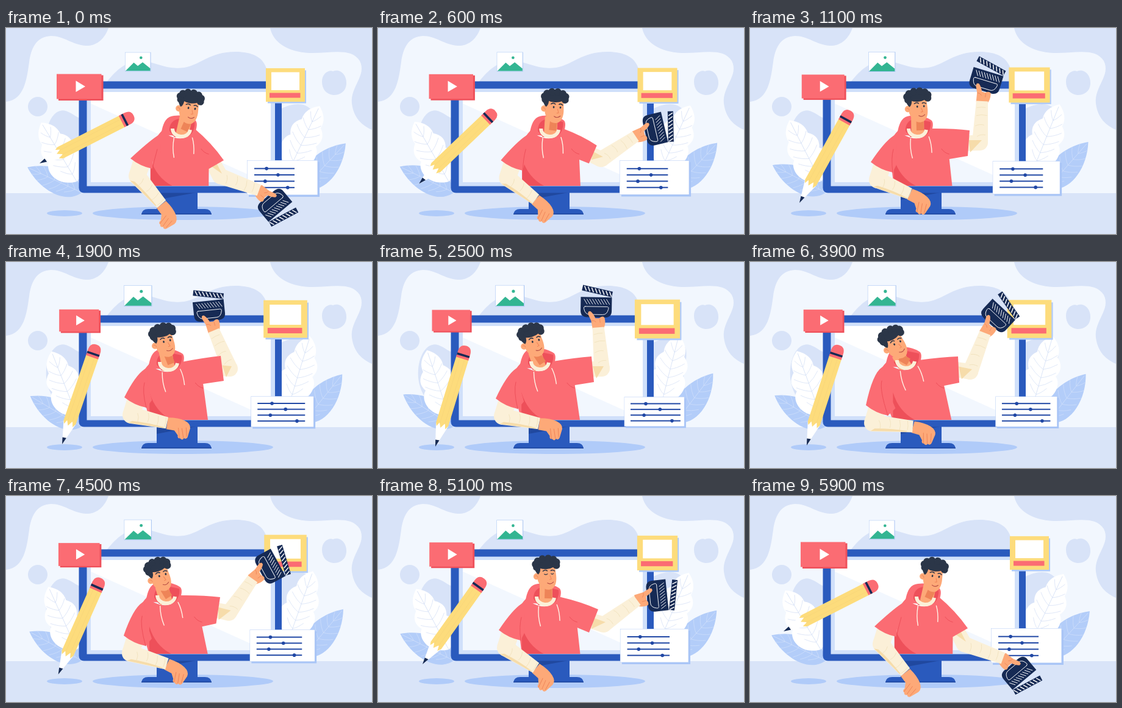
Write an HTML page with a canvas that moves like this. It is 600 by 338 pixels and loops after 6 s.

```html
<!DOCTYPE html>
<html lang="en">
<head>
<meta charset="utf-8">
<title>Video editing</title>
<style>
  html, body { margin: 0; width: 100%; height: 100%; overflow: hidden; background: #f2f7fe; }
  canvas { display: block; width: 100vw; height: 100vh; }
</style>
</head>
<body>
<canvas id="stage"></canvas>
<script>
const LOOP = 6000, RAD = Math.PI / 180;
const canvas = document.getElementById('stage');
const c = canvas.getContext('2d');

const C = {
  sky: '#f2f7fe', blob: '#d8e3f8', pool: '#b0cbf9', frame: '#2a5abd', deep: '#20489f',
  trim: '#d0e0fa', red: '#fb6c73', dark: '#ee505a', yellow: '#fddc7c', navy: '#162a54',
  skin: '#fda978', blush: '#ee8458', hair: '#2b3648', cream: '#fbf0d8', crease: '#efdfb8',
  tan: '#f6dcaa', leaf: '#b3cdf9', vein: '#cfdcf5', green: '#33b592', white: '#fff'
};

// Pose values at these times; the first value returns at 5900.
const TIMES = [0, 1100, 1900, 2500, 3900, 5100, 5900];
const POSE = {
  neck:   [[288, 275, 267, 266, 256, 275], [171, 171, 170, 169, 167, 171]],
  head:   [[298, 274, 259, 254, 238, 275], [135, 133, 135, 135, 139, 132], [8, -4, -14, -17, -27, -4]],
  cuffL:  [[204, 198, 194, 193, 190, 198], [214, 220, 222, 224, 235, 220]],
  wristL: [[255, 262, 264, 264, 267, 259], [289, 272, 264, 265, 270, 282], [80, 54, 36, 36, 43, 68]],
  cuffR:  [[357, 360, 352, 350, 341, 361], [217, 168, 154, 155, 155, 186]],
  under:  [[331, 357, 357, 354, 343, 346], [232, 210, 195, 197, 198, 224]],
  elbowR: [[351, 377, 367, 367, 361, 370], [243, 188, 175, 175, 180, 211], [20, -87, -113, -95, -69, -36]],
  clap:   [[140, 17, -6, 1, 43, 84]]
};
const PENCIL = [[55, 81, 92, 94, 93, 73], [222, 287, 299, 303, 301, 276], [27, 61, 71, 73, 72, 54.5]];

// Periodic cubic through the pose values, without overshoot.
function value(row, t) {
  const n = TIMES.length;
  const time = i => TIMES[(i + n) % n] + Math.floor(i / n) * LOOP;
  const val = i => row[(i + n) % n % 6];
  const slope = i => (val(i + 1) - val(i)) / (time(i + 1) - time(i));
  const tangent = i => {
    const a = slope(i - 1), b = slope(i);
    return a * b <= 0 ? 0 : 2 * a * b / (a + b);
  };
  let i = n - 1;
  while (t < TIMES[i]) i--;
  const h = time(i + 1) - time(i), u = (t - time(i)) / h, v = 1 - u;
  return v * v * (1 + 2 * u) * val(i) + u * u * (3 - 2 * u) * val(i + 1)
    + h * u * v * (v * tangent(i) - u * tangent(i + 1));
}
const sample = (rows, t) => rows.map(row => value(row, t));

function at(x, y, angle, scale, draw) {
  c.save();
  c.translate(x, y);
  c.rotate(angle * RAD);
  c.scale(scale, scale);
  draw();
  c.restore();
}
function fill(d, color) { c.fillStyle = color; c.fill(new Path2D(d)); }
function line(d, color, width = 1) {
  c.strokeStyle = color;
  c.lineWidth = width;
  c.stroke(new Path2D(d));
}
function rect(x, y, w, h, color) { c.fillStyle = color; c.fillRect(x, y, w, h); }
function oval(x, y, rx, ry, color) {
  c.fillStyle = color;
  c.beginPath();
  c.ellipse(x, y, rx, ry, 0, 0, 7);
  c.fill();
}
const dot = (x, y, r, color) => oval(x, y, r, r, color);

function backdrop() {
  rect(0, 0, 600, 338, C.sky);
  fill('M0 0H168C160 22 145 30 130 29C108 27 94 13 74 13C49 14 41 34 38 56C34 84 30 118 0 121Z', C.blob);
  fill('M433 0C438 24 462 39 497 41C530 42 566 31 580 54C592 78 564 96 567 124C570 148 584 160 600 167V0Z', C.blob);
  fill(`M98 271C102 240 62 225 66 176C69 146 84 132 98 136C110 140 116 148 124 148L164 90
    C178 72 196 53 222 54C248 56 262 69 292 65C318 61 334 39 376 39C404 39 420 48 426 64
    L452 132C468 124 490 120 502 136C514 158 490 190 508 220C518 240 506 260 500 271Z`, C.blob);
  dot(52, 129, 16, C.blob);
  fill('M518 88C518 74 530 68 536 71C548 66 559 77 558 92C557 104 548 110 537 110C525 109 518 100 518 88Z', C.blob);
  rect(0, 271, 600, 67, '#d9e4f8');
  oval(96, 304, 29, 5, C.pool);
  oval(290, 304, 148, 11, C.pool);
}

function leaf(x, y, angle, len, w, wavy) {
  const side = s => wavy
    ? `C${len * .08} ${s * w * .9} ${len * .36} ${s * w} ${len * .45} ${s * w * .64}
       Q${len * .6} ${s * w * .92} ${len * .72} ${s * w * .48}Q${len * .88} ${s * w * .55} ${len} 0`
    : `C${len * .15} ${s * w} ${len * .65} ${s * w * .9} ${len} 0`;
  const vein = wavy ? C.vein : '#d3e1fb';
  at(x, y, angle, 1, () => {
    fill(`M0 0${side(-1)}L0 0${side(1)}Z`, wavy ? C.white : C.leaf);
    line(`M0 0H${len * .96}`, vein, .7);
    for (let k = 1; k < 7; k++) {
      const s = len * k * .125, r = w * .6 * Math.sin(k * .4 + .3);
      line(`M${s + 14} ${-r}Q${s + 4} ${-r * .5} ${s} 0Q${s + 4} ${r * .5} ${s + 14} ${r}`, vein, .6);
    }
  });
}

function leaves(p) {
  leaf(124, 270, 205 + 8 * p, 98, 29);
  leaf(116, 252, 239 + 13.5 * p, 113, 36, true);
  leaf(488, 263, -47 - 6 * p, 101, 32);
  leaf(465, 231, -64.5 - 12 * p, 114, 36, true);
}

function monitor() {
  fill('M247 270H314V299H247Z', C.frame);
  fill('M247 270H312L247 282Z', C.deep);
  fill('M222 306Q223 297 233 297H326Q336 297 337 306Z', C.frame);
  rect(222, 304.5, 115, 1.5, C.deep);
  c.fillStyle = C.frame;
  c.beginPath();
  c.roundRect(119.5, 87.5, 332.5, 183, 8);
  c.fill();
  rect(132.5, 99.5, 308.5, 160, C.trim);
  rect(139, 105, 295, 148, C.white);
  fill('M139 124L425 253H139Z', C.sky);
}

function cards(p) {
  at(120, 96, 0, 1 - .16 * p, () => {
    rect(-34, -18.5, 73.5, 41.5, C.dark);
    rect(-37, -20.5, 73.5, 41, C.red);
    fill('M-5.5 -9.5V9L10 0Z', C.white);
  });
  at(216, 55.3, 0, 1 + .13 * p, () => {
    rect(-21, -15.5, 42.5, 31.5, '#a9c5f3');
    rect(-20.5, -15, 41, 30, C.white);
    fill('M-20 15L-6.5 1.5L0 7L8 1L20.5 11V15Z', C.green);
    dot(5.3, -6.5, 2.3, C.green);
  });
  at(458, 93.5, 0, 1 + .17 * p, () => {
    rect(-29, -24, 63, 54, C.pool);
    rect(-32, -27.5, 64, 55, C.yellow);
    rect(-23, -21, 46, 29.5, C.white);
    rect(-26, 13, 50.5, 8, C.red);
  });
  at(453, 245.5, 0, 1 - .16 * p, () => {
    rect(-55, -25.5, 116, 57, '#a9c5f6');
    rect(-58, -28.5, 116, 57, '#b4cbf5');
    rect(-57.5, -28, 115, 56, C.white);
  });
  const left = 407 + 7.5 * p, width = 66 + 17 * p;
  [.305, .59, .27, .83].forEach((f, i) => {
    const y = 230.6 + 2 * p + i * (10.4 - 1.1 * p);
    rect(left, y - 1, width, 2, '#2148a5');
    dot(left + width * f, y, 2.8, '#2148a5');
  });
}

function pencil(t) {
  const [x, y, angle] = sample(PENCIL, t);
  at(x, y, -angle, 1, () => {
    fill('M0 0L38 -10.5L46 0L38 10.5Z', C.white);
    fill('M0 0L11 -3.2L12 3.2Z', C.navy);
    fill('M38 -10.5H153V10.5H38L32 7L41 4L32 -1L40 -5L33 -8Z', C.yellow);
    line('M40 -4H153M40 4H153', '#f6d47a', .6);
    fill('M151 -10.5H162Q173 -10 173 0Q173 10 162 10.5H151Z', C.red);
    rect(155, -10.5, 3.6, 21, C.navy);
  });
}

// The board and the hand that grips it, placed from the wrist.
function clapper(angle, x, y) {
  at(x, y, angle, 1, () => {
    c.translate(-4, -33);
    fill('M-25.5 -16.5H25.5V6Q25.5 16.5 14 16.5H-14Q-25.5 16.5 -25.5 6Z', C.navy);
    for (let k = 0; k < 9; k++) line(`M${k * 4.6 - 20} -13l5 8`, C.white, .9);
    line('M-18 -1H18Q21 -1 20 3Q18 12 11 12H-11Q-18 12 -20 3Q-21 -1 -18 -1Z', C.white, .9);
    at(25, -17, 12, 1, () => {
      rect(-50, -9, 50, 9, C.navy);
      for (let k = 0; k < 8; k++) line(`M${k * 6 - 47} -7.5l4 6`, C.white, 1.5);
    });
    fill('M-5 37L-8 22L-13 12Q-14 6 -9 7Q-4 11 -1 18L5 18Q11 13 14 17Q17 27 12 37Z', C.skin);
    line('M-7 22Q-3 21 0 24M6 19L7 25', C.blush, .8);
  });
}

function limb(a, b, d, wa, wb, wd) {
  c.fillStyle = C.cream;
  [[a, b, wa, wb], [b, d, wb, wd]].forEach(([p, q, w, v]) => {
    const n = Math.atan2(q[1] - p[1], q[0] - p[0]) + Math.PI / 2;
    const s = Math.sin(n) / 2, k = Math.cos(n) / 2;
    c.beginPath();
    c.moveTo(p[0] + k * w, p[1] + s * w);
    c.lineTo(q[0] + k * v, q[1] + s * v);
    c.lineTo(q[0] - k * v, q[1] - s * v);
    c.lineTo(p[0] - k * w, p[1] - s * w);
    c.fill();
  });
  dot(b[0], b[1], wb / 2, C.cream);
  const turn = Math.atan2(d[1] - b[1], d[0] - b[0]) / RAD;
  at(b[0], b[1], turn, 1, () => {
    line('M10 -5Q14 0 13 8M27 -9Q31 -2 29 5M44 -8Q47 0 45 9M57 -8Q59 0 58 6', C.crease, .7);
  });
}

function rightArm(pose) {
  const [ex, ey, fore] = pose.elbowR, [tx, ty] = pose.cuffR, [ux, uy] = pose.under;
  const wx = ex + 68 * Math.cos(fore * RAD), wy = ey + 68 * Math.sin(fore * RAD);
  clapper(pose.clap[0], wx, wy);
  limb([(tx + ux) / 2 - 3, (ty + uy) / 2], [ex, ey], [wx, wy], 25, 26, 19);
  fill(`M${(tx + ux) / 2} ${(ty + uy) / 2 - 5}L${ex + 3} ${ey - 4}L${ux + 4} ${uy - 6}Z`, C.tan);
}

function torso(pose) {
  const [nx, ny] = pose.neck, [tx, ty] = pose.cuffR, [ux, uy] = pose.under;
  const [hx, hy, tilt] = pose.head;
  const bl = 216 + nx * .072, br = 317 + nx * .053, ax = nx * .45 + 203;
  at(nx, ny, 0, 1, () => {
    fill('M-34 4C-32 -6 -30 -20 -20 -25C-6 -30 12 -27 23 -19C27 -14 24 -3 19 8Z', C.red);
    fill('M-20 -2C-21 -13 -14 -21 -4 -22L21 -17C23 -8 17 4 11 8H-12Z', C.dark);
  });
  c.lineCap = 'butt';
  const jx = hx + (tilt < 0 ? -tilt * .15 : -3), jy = hy + 12;
  line(`M${jx} ${jy}L${nx} ${ny + 7}`, C.skin, 21);
  line(`M${jx + 4} ${jy + 5}L${nx + 4} ${ny - 3}`, C.blush, 12);
  c.save();
  c.beginPath();
  c.rect(0, 0, 600, 259);
  c.clip();
  fill(`M${nx - 32} ${ny - 3}C${nx - 18} ${ny + 12} ${nx + 12} ${ny + 18} ${nx + 21} ${ny - 6}
    Q${(nx + 24 + tx) / 2 + 3} ${(ny + ty) / 2 - 5} ${tx} ${ty}
    L${ux} ${uy}L${ax} ${Math.min(uy + 5, 216)}L${br} 260H${bl}
    L${nx - 46} ${ny + 32}L${nx - 40} ${ny + 7}Q${nx - 36} ${ny + 1} ${nx - 32} ${ny - 3}Z`, C.red);
  fill(`M${bl} 214Q${bl + 10} 247 ${bl + 38} 260H${bl}Z`, C.dark);
  line(`M${ax} 207Q${ax - 8} 205 ${ax - 13} 198`, C.dark, 1);
  c.restore();
  at(nx, ny, 0, 1, () => line('M-15 -6C-15 10 11 12 14 -4', C.cream, 6));
  c.lineCap = 'round';
  at(nx, ny, tilt * .45, 1, () => {
    line('M-12 10Q-14 27 -10 42M18 8Q22 19 22 34', '#fff3e6', 1.4);
  });
}

function head([x, y, tilt], t) {
  at(x, y, tilt, 1, () => {
    dot(-15, -1, 5.2, C.skin);
    fill('M-14 -20L-14 2C-13 14 -4 22 4 22C14 22 18 11 17 -2L16 -20Z', C.skin);
    line('M-17 -2Q-14 -4 -13 1', C.blush, .9);
    fill('M-18 -18H-8Q-7 -8 -12 -4Q-17 -8 -18 -18Z', C.hair);
    oval(2, -21, 17, 9, C.hair);
    for (let a = 155; a < 385; a += 32) {
      dot(2 + 17.5 * Math.cos(a * RAD), -20 + 9.5 * Math.sin(a * RAD), 6, C.hair);
    }
    line('M-4 -9Q0 -12 3 -9M9 -9Q12 -11 15 -8', C.hair, 1.5);
    if (Math.abs(t - 5100) < 130) line('M-2 -4Q1 -2 3 -4M9 -4Q11 -2 13 -4', C.hair, 1.2);
    else [.5, 11.5].forEach(ex => oval(ex, -4, 1.4, 1.8, C.hair));
    line('M7 -1L9 5L6 5.5', C.blush, 1);
    line('M2 11Q7 14.5 12 10', '#b64e45', 1.1);
  });
}

function leftArm(pose) {
  const [ox, oy] = pose.cuffL, [wx, wy, turn] = pose.wristL, [nx, ny] = pose.neck;
  at(wx, wy, turn, 1, () => {
    fill('M-4 -8Q10 -18 21 -20Q32 -22 36 -15L41 -1Q42 4 37 4Q38 9 32 8Q29 11 26 6L17 3L5 9Z', C.skin);
    line('M25 -7L36 4M20 -4L31 8M30 -12L39 -1', C.blush, .9);
  });
  const elbow = [ox + 11, oy + 29], bl = 216 + nx * .072;
  limb([ox + 18, oy + 8], elbow, [wx, wy], 29, 28, 19);
  at(...elbow, Math.atan2(wy - elbow[1], wx - elbow[0]) / RAD, 1, () => {
    fill('M-2 13.5Q30 11 56 9.5L58 8Q30 6 4 9Z', C.tan);
  });
  fill(`M${nx - 36} ${ny + 3}L${nx - 40} ${ny + 6}Q${nx - 55} ${ny + 16} ${ox} ${oy}
    Q${ox + 16} ${oy + 13} ${ox + 36} ${oy + 17}L${bl + 4} ${oy + 5}L${nx - 34} ${ny + 34}Z`, C.red);
  line(`M${ox + 36} ${oy + 17}Q${nx - 44} ${ny + 42} ${nx - 40} ${ny + 28}`, C.dark, 1);
}

function render(now) {
  const t = now % LOOP, p = (1 - Math.cos(2 * Math.PI * t / LOOP)) / 2;
  const w = Math.round(innerWidth * devicePixelRatio), h = Math.round(innerHeight * devicePixelRatio);
  if (canvas.width !== w || canvas.height !== h) {
    canvas.width = w;
    canvas.height = h;
  }
  c.setTransform(w / 600, 0, 0, h / 338, 0, 0);
  c.lineCap = c.lineJoin = 'round';
  const pose = {};
  for (const part in POSE) pose[part] = sample(POSE[part], t);
  backdrop();
  leaves(p);
  monitor();
  cards(p);
  pencil(t);
  rightArm(pose);
  torso(pose);
  head(pose.head, t);
  leftArm(pose);
}

const start = performance.now();
function tick() {
  render(performance.now() - start);
  requestAnimationFrame(tick);
}
tick();
</script>
</body>
</html>
```
